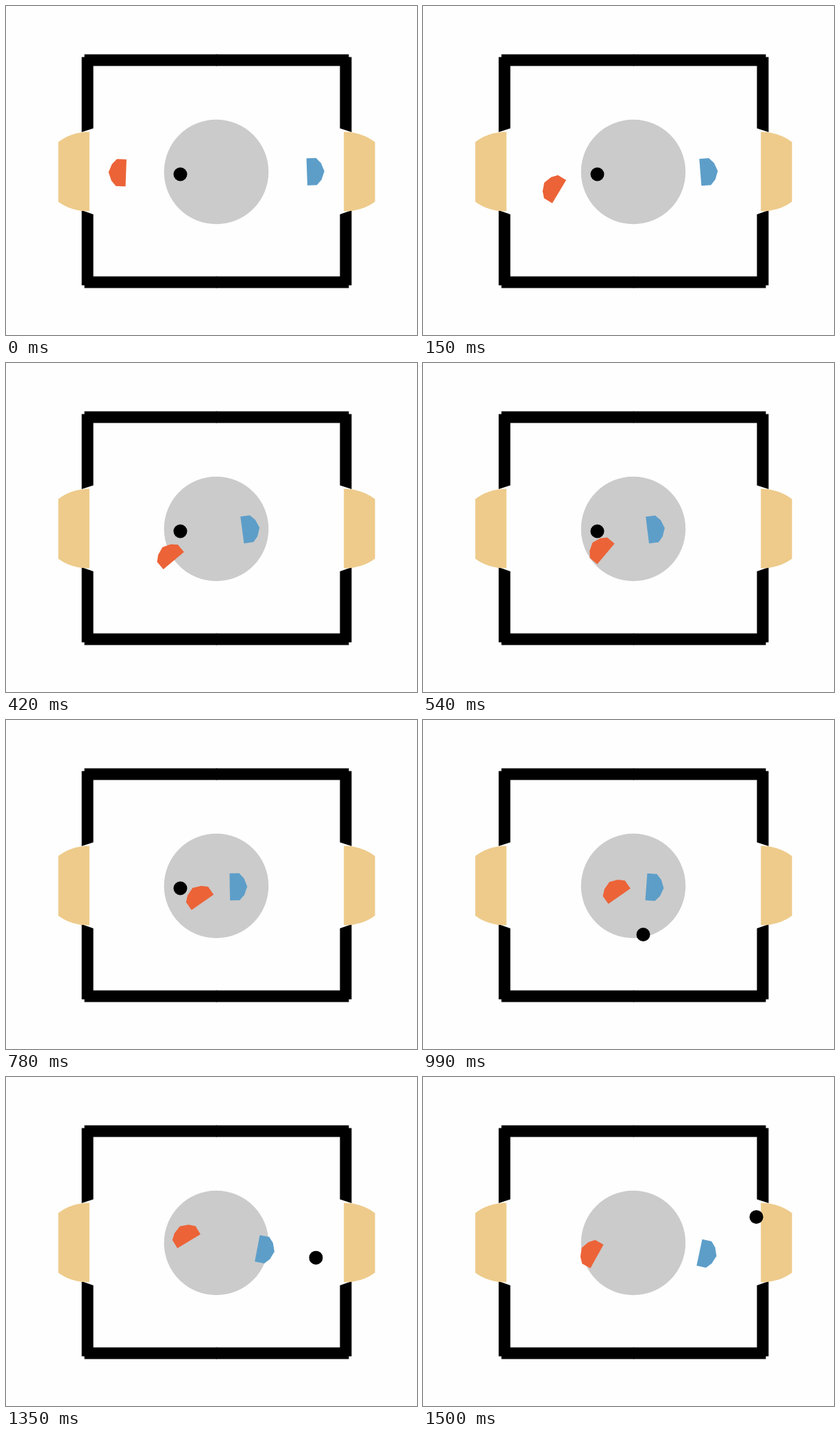
Write an HTML page that moves like this. It is 600 by 480 pixels and loops after 1530 ms.

```html
<!DOCTYPE html>
<html lang="en">
<head>
<meta charset="utf-8">
<title>Robot soccer</title>
<style>
  html, body { margin: 0; width: 100%; height: 100%; overflow: hidden; background: #fefefe; }
  svg { display: block; width: 600px; height: 480px; }
</style>
</head>
<body>
<svg viewBox="0 0 600 480">
  <defs>
    <g id="side">
      <path d="M110.5 74.5H114.5V70.5H308V87.5H127.5V178.5L110.5 184ZM110.5 298L127.5 304V394.500H308V411.500H114.500V407.500H110.5Z"/>
      <path fill="#eecb8b" d="M121.800 183.500V299.500Q95 299.500 76.300 285.500V198.500Q95 184 121.800 183.500Z"/>
    </g>
    <path id="robot" d="M0 -19.700L14 -19.700L21 -12L25.500 0L21 12L14 19.700L0 19.700Z"/>
  </defs>
  <use href="#side"/>
  <use href="#side" transform="translate(615) scale(-1 1)"/>
  <circle cx="307" cy="242" r="76.300" fill="#cbcbcb"/>
  <use id="red" href="#robot" fill="#ec6337"/>
  <use id="blue" href="#robot" fill="#5d9ec9"/>
  <circle id="ball" r="10"/>
</svg>
<script>
const LOOP = 1530, STEP = 30;
const BALL_SPEED = 0.634; // px per ms

// Driving waypoints: time, x, y, heading in degrees
const redRoute = [
  [0, 175.2, 243.5, 182], [300, 222.5, 298.3, 240], [540, 267, 278.5, 220], [780, 287, 266, 235],
  [1140, 286.5, 250.7, 235], [1350, 267, 239.7, 239], [LOOP - STEP, 254, 261.7, 209]
];
const blueRoute = [
  [0, 439.3, 242, -2], [300, 370.5, 243.3, -7], [500, 327.7, 243.8, -8],
  [1180, 325.3, 243.2, 9], [LOOP - STEP, 403.5, 256, 12]
];

// The ball rests, is kicked, then bounces off the wall and the goal post
const ballRest = [254.5, 245.5];
const ballHits = [
  { at: 840, angle: 45.2, speed: BALL_SPEED },
  { at: 1140, angle: -61.3, speed: BALL_SPEED },
  { at: 1470, angle: 108, speed: BALL_SPEED * 0.4 }
];

function drive(route, time) {
  const i = Math.max(1, route.findIndex(([at]) => at >= time));
  const [from, ...pose] = route[i - 1], [to, ...target] = route[i];
  const k = (time - from) / (to - from);
  return pose.map((value, n) => value + (target[n] - value) * k);
}

function roll(time) {
  let [x, y] = ballRest;
  ballHits.forEach(({ at, angle, speed }, i) => {
    const end = i + 1 < ballHits.length ? ballHits[i + 1].at : LOOP;
    const distance = speed * Math.max(0, Math.min(time, end) - at);
    x += distance * Math.cos(angle * Math.PI / 180);
    y += distance * Math.sin(angle * Math.PI / 180);
  });
  return [x, y, 0];
}

function place(id, [x, y, heading]) {
  document.getElementById(id).setAttribute("transform", `translate(${x} ${y}) rotate(${heading})`);
}

const start = performance.now();

function draw() {
  const elapsed = (performance.now() - start) % LOOP;
  const time = Math.floor(elapsed / STEP) * STEP;
  place("red", drive(redRoute, time));
  place("blue", drive(blueRoute, time));
  place("ball", roll(time));
  requestAnimationFrame(draw);
}
draw();
</script>
</body>
</html>
```
